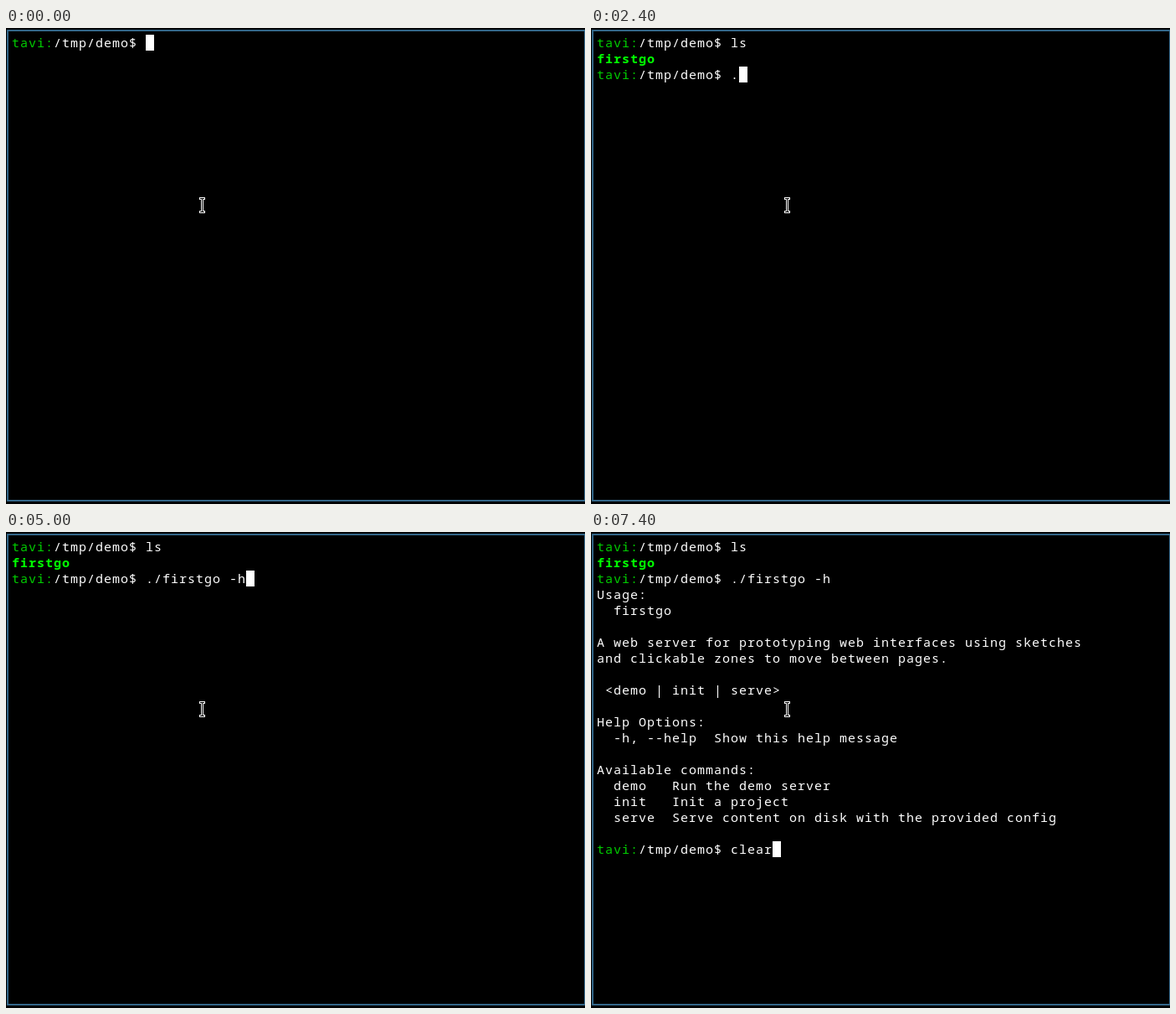
Recreate the animation shown at these times as an HTML page. Size 692x568 px, loop 8000 ms.

```html
<!DOCTYPE html>
<html lang="en">
<head>
<meta charset="utf-8">
<title>Terminal session</title>
<style>
  html, body { margin: 0; width: 692px; height: 568px; overflow: hidden; background: #000; }
  svg { display: block; }
  text {
    font: 15px "Noto Sans Mono", "DejaVu Sans Mono", monospace;
    letter-spacing: calc(10px - .6em);
    font-variant-ligatures: none;
    white-space: pre;
    fill: #fff;
  }
  .user { fill: #00cd00; }
  .exec { fill: #0f0; font-weight: bold; }
</style>
</head>
<body>
<svg width="692" height="568" viewBox="0 0 692 568">
  <rect width="692" height="568"/>
  <rect x="2" y="3" width="690" height="561" fill="none" stroke="#336688" stroke-width="2" shape-rendering="crispEdges"/>
  <g id="screen"></g>
  <rect id="caret" width="10" height="19" fill="#fff" shape-rendering="crispEdges"/>
  <path d="M231.5 202.5h6v2h-2v14h2v2h-6v-2h2v-14h-2z" fill="#000" stroke="#fff" shape-rendering="crispEdges"/>
</svg>
<script>
const LOOP = 8000, CELL = 10, ROW = 19, LEFT = 7, TOP = 8, BASELINE = 15;
const PROMPT = "tavi:/tmp/demo$ ";

const HELP = `Usage:
  firstgo

A web server for prototyping web interfaces using sketches
and clickable zones to move between pages.

 <demo | init | serve>

Help Options:
  -h, --help  Show this help message

Available commands:
  demo   Run the demo server
  init   Init a project
  serve  Serve content on disk with the provided config
`.split("\n");

// Each prompt: its row, when it appears, and [time, typed characters] steps.
const prompts = [
  { row: 0, at: 0, command: "ls", keys: [[1000, 1], [1100, 2]] },
  { row: 2, at: 1700, command: "./firstgo -h",
    keys: [[2400, 1], [2500, 2], [2900, 3], [3100, 4], [3200, 5], [3500, 10], [4700, 11], [5000, 12]] },
  { row: 19, at: 5500, command: "clear",
    keys: [[6800, 1], [7000, 2], [7100, 3], [7300, 4], [7400, 5]] }
];

const screen = document.getElementById("screen");
const caret = document.getElementById("caret");
const timed = [];

function addText(row, col, string, at, style = "") {
  const el = document.createElementNS("http://www.w3.org/2000/svg", "text");
  el.setAttribute("x", LEFT + col * CELL);
  el.setAttribute("y", TOP + row * ROW + BASELINE);
  el.setAttribute("class", style);
  el.textContent = string;
  screen.append(el);
  timed.push({ el, at });
  return el;
}

for (const p of prompts) {
  addText(p.row, 0, PROMPT.slice(0, 5), p.at, "user");
  addText(p.row, 5, PROMPT.slice(5), p.at);
  p.el = addText(p.row, PROMPT.length, "", p.at);
}
addText(1, 0, "firstgo", 1700, "exec");
HELP.forEach((line, i) => addText(3 + i, 0, line, 5500));

function draw(t) {
  for (const { el, at } of timed) el.style.visibility = t >= at ? "visible" : "hidden";
  for (const p of prompts) {
    const count = p.keys.reduce((n, [at, length]) => t >= at ? length : n, 0);
    const typed = p.command.slice(0, count);
    if (p.el.textContent !== typed) p.el.textContent = typed;
    if (t >= p.at) {
      caret.setAttribute("x", LEFT + (PROMPT.length + count) * CELL);
      caret.setAttribute("y", TOP + p.row * ROW);
    }
  }
}

let start;
function tick(now) {
  start ??= now;
  draw((now - start) % LOOP);
  requestAnimationFrame(tick);
}
draw(0);
requestAnimationFrame(tick);
</script>
</body>
</html>
```
